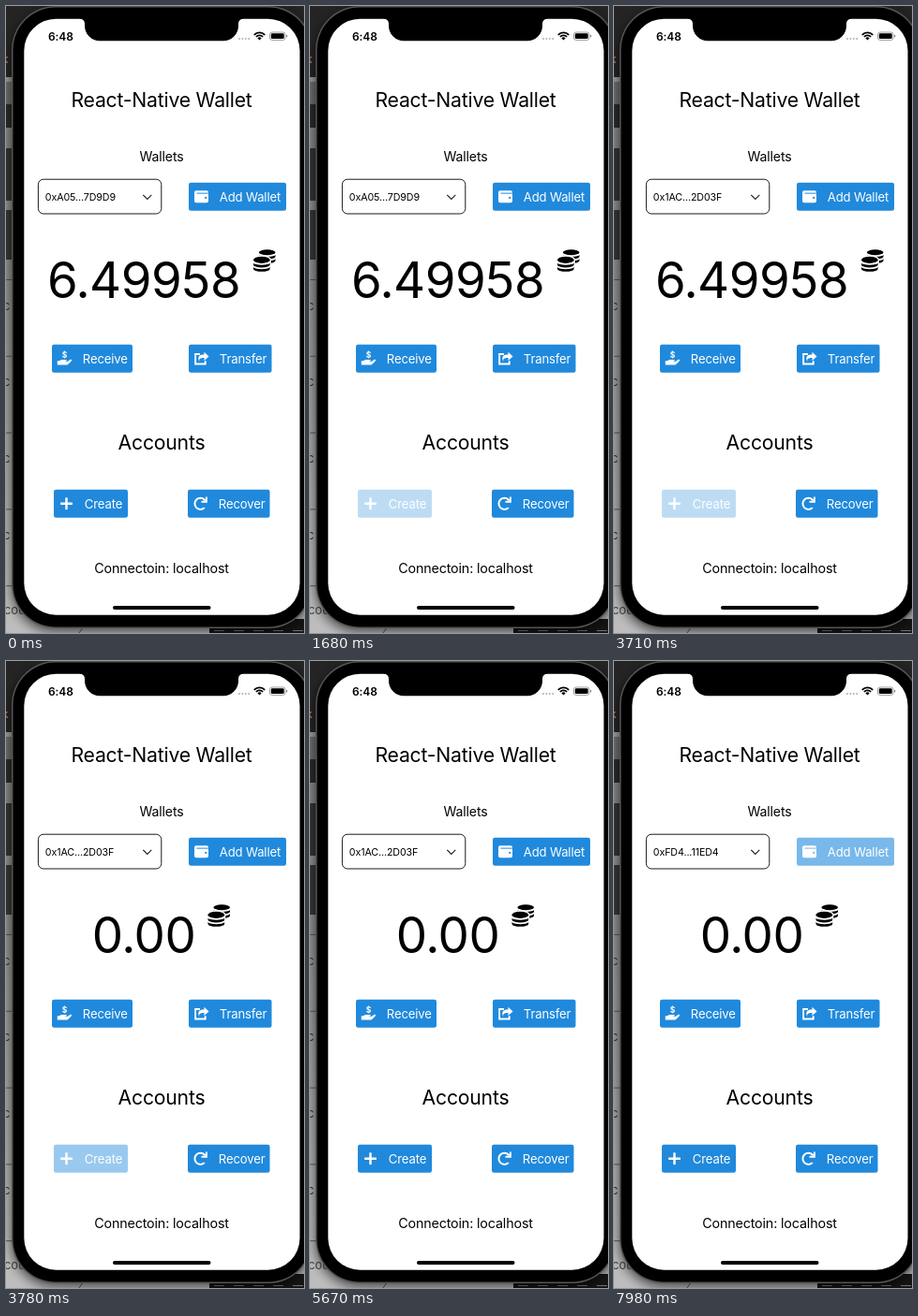
Animation of 318 by 670 pixels, one loop 8000 ms. Source, as an HTML page with a canvas:

```html
<!DOCTYPE html>
<html lang="en">
<head>
<meta charset="utf-8">
<title>Wallet</title>
<style>
  html, body { margin: 0; width: 100%; height: 100%; overflow: hidden; background: #000; }
  canvas { display: block; width: 318px; height: 670px; }
</style>
</head>
<body>
<canvas id="stage"></canvas>
<script>
const LOOP = 8000;
const BLUE = '#2089dc';
const CENTER = 166;
const canvas = document.getElementById('stage');
const ctx = canvas.getContext('2d');
const ratio = window.devicePixelRatio || 1;
canvas.width = 318 * ratio;
canvas.height = 670 * ratio;

function rect(x, y, w, h, color) {
  ctx.fillStyle = color;
  ctx.fillRect(x, y, w, h);
}

function roundRect(x, y, w, h, r, color) {
  ctx.beginPath();
  ctx.roundRect(x, y, w, h, r);
  ctx.fillStyle = color;
  ctx.fill();
}

function poly(points, color) {
  ctx.beginPath();
  points.forEach(([x, y]) => ctx.lineTo(x, y));
  ctx.fillStyle = color;
  ctx.fill();
}

function line(points, width, color) {
  ctx.beginPath();
  points.forEach(([x, y]) => ctx.lineTo(x, y));
  ctx.lineWidth = width;
  ctx.strokeStyle = color;
  ctx.stroke();
}

// y is the middle of the capital letters
function text(str, x, y, size, { align = 'left', color = '#000', weight = 400 } = {}) {
  ctx.font = `${weight} ${size}px Inter, sans-serif`;
  ctx.letterSpacing = `${-0.01 * size}px`;
  ctx.textAlign = align;
  ctx.fillStyle = color;
  ctx.fillText(str, x, y + size * 0.36);
}

function drawDesktop() {
  const shade = ctx.createLinearGradient(0, 260, 0, 660);
  shade.addColorStop(0, '#8c8c8c');
  shade.addColorStop(1, '#bdbdbd');
  rect(0, 0, 318, 670, shade);
  rect(0, 0, 318, 76, '#242424');
  rect(0, 76, 10, 5, '#999');
  rect(0, 81, 10, 24, '#6c6c6c');
  rect(0, 105, 10, 25, '#292929');
  rect(0, 130, 10, 22, '#858585');
  rect(0, 152, 10, 56, '#333');
  rect(0, 208, 10, 10, '#8c8c8c');
  rect(0, 218, 10, 53, '#363636');
  for (let i = 0; i < 5; i++) {
    const y = 292 + i * 81.8;
    rect(0, y, 12, 1, '#555');
    if (i < 4) text('c', -3, y + 28, 13, { color: '#333' });
  }
  text('k', -4, 57, 12, { color: '#c08a52' });
  text('cou', -2, 645, 13, { color: '#444' });
  rect(217, 655, 101, 15, '#151515');
  line([[78, 670], [82, 664]], 1, '#555');
  for (let x = 222; x < 310; x += 21) rect(x, 667, 11, 1, '#777');
}

function drawPhone() {
  ctx.save();
  ctx.shadowColor = 'rgba(0,0,0,.6)';
  ctx.shadowBlur = 12 * ratio;
  ctx.shadowOffsetY = 4 * ratio;
  roundRect(6, 0, 321, 665, 47, '#555');
  ctx.restore();
  roundRect(7.5, 1.5, 318, 662, 45.5, '#000');
  roundRect(19.3, 13.7, 294.2, 637, 34, '#fff');

  ctx.beginPath();
  ctx.moveTo(79, 13);
  ctx.lineTo(79, 13.7);
  ctx.arcTo(84, 13.7, 84, 19, 5);
  ctx.arcTo(84, 37.3, 100, 37.3, 16);
  ctx.arcTo(248, 37.3, 248, 21, 16);
  ctx.arcTo(248, 13.7, 253, 13.7, 5);
  ctx.lineTo(253, 13);
  ctx.fillStyle = '#000';
  ctx.fill();

  text('6:48', 45, 32.3, 12, { weight: 600 });
  for (let i = 0; i < 4; i++) roundRect(248 + i * 3.4, 34, 2, 2, 1, '#b0b0b0');
  for (const r of [2, 5.1, 8.1]) {
    ctx.beginPath();
    if (r === 2) ctx.moveTo(270.5, 36.5);
    ctx.arc(270.5, 36.5, r === 2 ? 3 : r, -Math.PI * 0.75, -Math.PI * 0.25);
    ctx.fillStyle = ctx.strokeStyle = '#000';
    ctx.lineWidth = 1.8;
    r === 2 ? ctx.fill() : ctx.stroke();
  }
  ctx.beginPath();
  ctx.roundRect(281.5, 28, 16.5, 8.4, 2.4);
  ctx.lineWidth = 0.8;
  ctx.strokeStyle = '#888';
  ctx.stroke();
  roundRect(282.8, 29.3, 13.9, 5.8, 1.3, '#000');
  roundRect(299, 30.8, 1.2, 2.8, 0.6, '#888');
  roundRect(114, 641, 104.5, 4, 2, '#000');
}

// Icons are drawn around their own centre
const icons = {
  wallet() {
    roundRect(-7.5, -6.5, 15, 13, 2, '#fff');
    rect(-5, -4.2, 12.5, 1, BLUE);
    roundRect(3.6, 0, 2.2, 2.2, 1.1, BLUE);
  },
  hand() {
    text('$', 0, -3.8, 8.5, { align: 'center', color: '#fff', weight: 700 });
    poly([[-7.7, 2.5], [-5.6, 2.5], [-3.7, 1.2], [2, 1.2], [2.3, 2.7], [-0.6, 3.2],
          [3, 3.2], [6.4, 0.8], [7.7, 1.5], [7.2, 2.9], [3, 6.7], [-7.7, 6.7]], '#fff');
  },
  share() {
    line([[-1.5, -4.7], [-6.4, -4.7], [-6.4, 5.8], [4.2, 5.8], [4.2, 2.6]], 1.9, '#fff');
    ctx.beginPath();
    ctx.moveTo(-2.2, 3.5);
    ctx.bezierCurveTo(-5, -2.5, -1.5, -4.2, 3, -4.2);
    ctx.lineTo(3, -7);
    ctx.lineTo(8, -2.3);
    ctx.lineTo(3, 2.3);
    ctx.lineTo(3, -0.8);
    ctx.bezierCurveTo(-1, -0.8, -3, 0, -2.2, 3.5);
    ctx.fillStyle = '#fff';
    ctx.fill();
  },
  plus() {
    roundRect(-6.5, -1.2, 13, 2.4, 0.8, '#fff');
    roundRect(-1.2, -6.5, 2.4, 13, 0.8, '#fff');
  },
  redo() {
    ctx.beginPath();
    ctx.arc(0, 0, 6.1, Math.PI * 0.25, Math.PI * 1.82);
    ctx.lineWidth = 2;
    ctx.strokeStyle = '#fff';
    ctx.stroke();
    line([[6.4, -7.3], [6.4, -2], [1, -2]], 1.9, '#fff');
  }
};

function button(label, icon, x, y, w, opacity = 1) {
  roundRect(x, y, w, 30, 2.3, BLUE);
  ctx.save();
  ctx.translate(x + 13.5, y + 15);
  icons[icon]();
  ctx.restore();
  text(label, x + 32.8, y + 15.4, 13.1, { color: '#fff' });
  if (opacity < 1) rect(x - 1, y - 1, w + 2, 32, `rgba(255,255,255,${1 - opacity})`);
}

function ellipse(x, y, rx, ry, color = '#000') {
  ctx.beginPath();
  ctx.ellipse(x, y, rx, ry, 0, 0, Math.PI * 2);
  ctx.fillStyle = color;
  ctx.fill();
}

function coinEdge(x, y, h) {
  ctx.beginPath();
  ctx.ellipse(x, y, 9, 2.4, 0, Math.PI, 0, true);
  ctx.ellipse(x, y + h, 9, 3, 0, 0, Math.PI);
  ctx.fillStyle = '#000';
  ctx.fill();
}

function drawCoins(x, y) {
  ctx.save();
  ctx.translate(x, y);
  ctx.scale(0.98, 0.98);
  ellipse(15, 3, 9, 3);
  coinEdge(15, 5.5, 2);
  coinEdge(15, 10, 2);
  ellipse(9, 11.2, 10.4, 5, '#fff');
  rect(-1, 11.2, 20.2, 11, '#fff');
  ellipse(9, 11.2, 9, 3.7);
  coinEdge(9, 14.4, 2.1);
  coinEdge(9, 18.9, 2.1);
  ctx.restore();
}

// Press is instant, release eases back over the given time
function pressOpacity(t, down, up, duration) {
  if (t < down) return 1;
  const p = Math.min(1, Math.max(0, (t - up) / duration));
  const eased = p < 0.5 ? 2 * p * p : 1 - 2 * (1 - p) ** 2;
  return 0.3 + 0.7 * eased;
}

function draw(time) {
  const t = Math.floor((time % LOOP) / 70) * 70;
  const address = t < 3710 ? '0xA05...7D9D9' : t < 7840 ? '0x1AC...2D03F' : '0xFD4...11ED4';
  const empty = t >= 3780;

  ctx.setTransform(ratio, 0, 0, ratio, 0, 0);
  drawDesktop();
  drawPhone();

  const centered = { align: 'center' };
  text('React-Native Wallet', CENTER, 100.8, 21.2, centered);
  text('Wallets', CENTER, 161, 14.1, centered);

  ctx.beginPath();
  ctx.roundRect(34.4, 185.2, 131.4, 36.8, 5.5);
  ctx.lineWidth = 0.9;
  ctx.strokeStyle = '#000';
  ctx.stroke();
  text(address, 41.8, 204, 10.7);
  line([[146.3, 201.8], [150.8, 206.3], [155.3, 201.8]], 1.2, '#222');
  button('Add Wallet', 'wallet', 195, 188.8, 104, pressOpacity(t, 5740, 7840, 300));

  text(empty ? '0.00' : '6.49958', 147, 293, 52.8, centered);
  drawCoins(empty ? 215.5 : 264, 260.3);

  button('Receive', 'hand', 49, 361.7, 86);
  button('Transfer', 'share', 195, 361.7, 88.5);
  text('Accounts', CENTER, 466, 21.2, centered);
  button('Create', 'plus', 51, 516.8, 79, pressOpacity(t, 1680, 3710, 210));
  button('Recover', 'redo', 194, 516.8, 87.5);
  text('Connectoin: localhost', CENTER, 601.2, 14.3, centered);
}

function frame() {
  draw(performance.now());
  requestAnimationFrame(frame);
}
frame();
</script>
</body>
</html>
```
